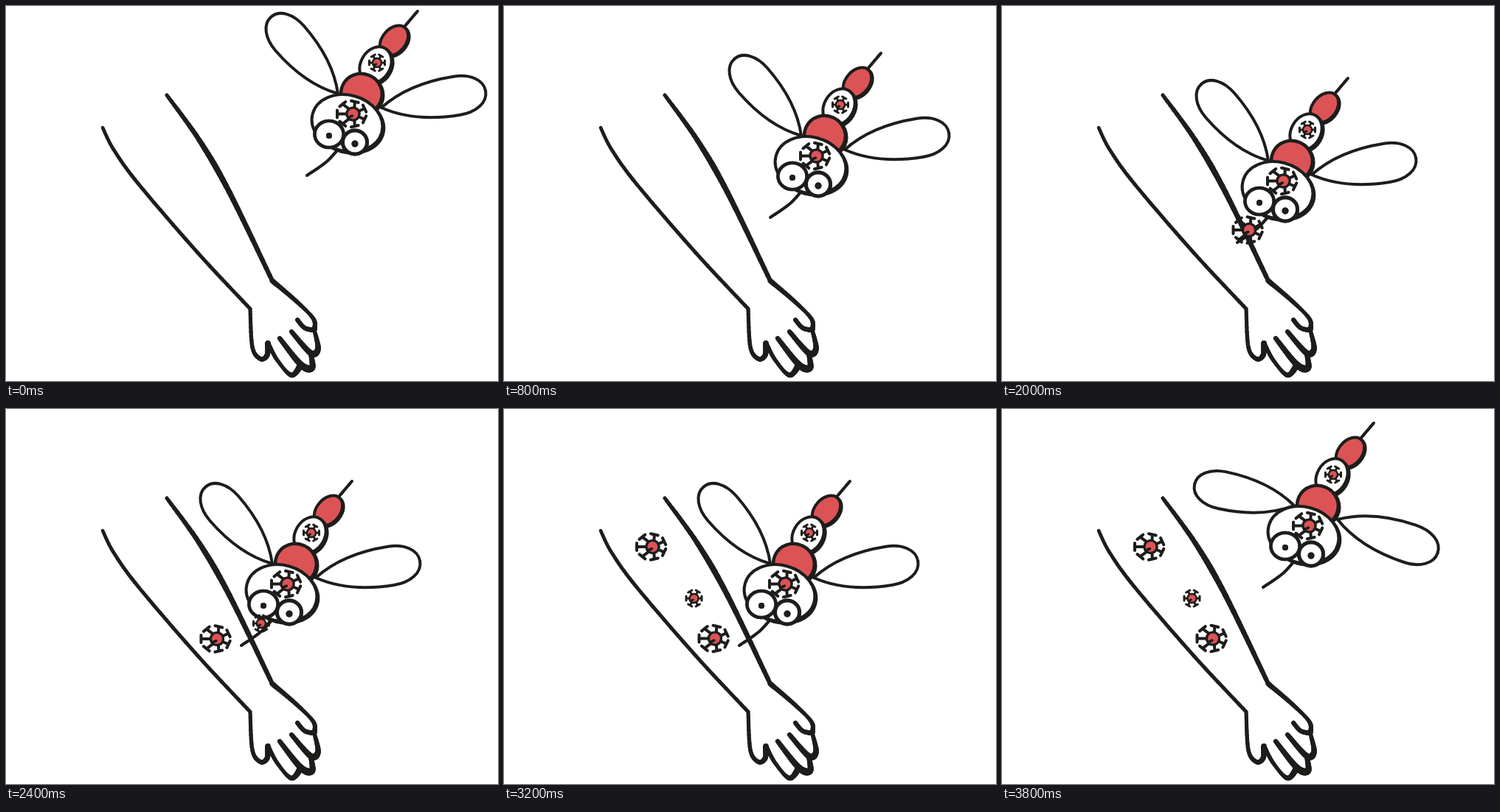
Animation of 667x509 px, one loop 4000 ms. Source, as an HTML page with a canvas:

```html
<!DOCTYPE html>
<html lang="en">
<head>
<meta charset="utf-8">
<title>Mosquito bite</title>
<style>
html, body { margin: 0; width: 100%; height: 100%; overflow: hidden; background: #fff; }
canvas { display: block; }
</style>
</head>
<body>
<canvas id="stage" width="667" height="509"></canvas>
<script>
const ctx = document.getElementById('stage').getContext('2d');
const INK = '#1d1d1b', RED = '#dc5356', WHITE = '#fff';
const STEP = 200, STEPS = 20;
const rad = deg => deg * Math.PI / 180;
const mix = (a, b, t) => a + (b - a) * t;

// Smooth ink line through a few points, width running from w0 over w1 to w2
function brush(pts, w0, w1 = w0, w2 = w1) {
  const last = pts.length - 1, n = 10 * last;
  const at = i => pts[Math.max(0, Math.min(last, i))];
  const point = u => {
    const i = Math.min(last - 1, Math.floor(u)), t = u - i;
    return [0, 1].map(k => {
      const [a, b, c, d] = [-1, 0, 1, 2].map(j => at(i + j)[k]);
      return b + 0.5 * t * (c - a + t * (2 * a - 5 * b + 4 * c - d + t * (3 * (b - c) + d - a)));
    });
  };
  for (let j = 0; j < n; j++) {
    const t = 2 * j / n;
    ctx.lineWidth = t < 1 ? mix(w0, w1, t) : mix(w1, w2, t - 1);
    ctx.beginPath();
    ctx.moveTo(...point(j / 10));
    ctx.lineTo(...point((j + 1) / 10));
    ctx.stroke();
  }
}

// Outlined ellipse with a heavier edge towards the lower right
function blob(x, y, rx, ry, deg, fill, line = 4, shade = 0) {
  ctx.beginPath();
  ctx.ellipse(x + shade, y + shade, rx + line / 2, ry + line / 2, rad(deg), 0, 7);
  ctx.fillStyle = INK;
  ctx.fill();
  ctx.beginPath();
  ctx.ellipse(x, y, rx, ry, rad(deg), 0, 7);
  ctx.fillStyle = fill;
  ctx.fill();
  ctx.lineWidth = line;
  ctx.stroke();
}

// Red core with a ring of T-shaped spikes
function virus(x, y, { spikes, rx, ry, core, bar, line, lean }) {
  ctx.lineWidth = line;
  for (let i = 0; i < spikes; i++) {
    const a = rad(180 + 360 * i / spikes), c = Math.cos(a), s = Math.sin(a);
    const ex = x + lean + rx * c, ey = y + ry * s;
    ctx.beginPath();
    ctx.moveTo(x + core * c, y + core * s);
    ctx.lineTo(ex, ey);
    ctx.moveTo(ex - s * bar, ey + c * bar);
    ctx.lineTo(ex + s * bar, ey - c * bar);
    ctx.stroke();
  }
  blob(x, y, core, core, 0, RED, line * 0.8);
  brush([[x - core * 0.8, y + core * 0.6], [x - 1, y + core * 0.3]], line * 0.8);
}
const BIG = { spikes: 7, rx: 19.5, ry: 17, core: 8.5, bar: 5, line: 4, lean: -2 };
const SMALL = { spikes: 6, rx: 10.5, ry: 11, core: 6, bar: 3, line: 3, lean: 0 };

function arm() {
  brush([[131, 165], [146, 195], [180, 242], [260, 335], [331, 411]], 4.5, 5, 5);
  brush([[218, 121], [262, 182], [303, 253], [361, 373]], 5, 8, 6);
  // wrist and thumb
  brush([[361, 373], [395, 402], [417, 425], [418, 440]], 7, 5, 7);
  brush([[331, 411], [334, 463], [345, 479], [354, 474], [355, 458]], 5, 6, 8);
  // fingers, from the far one to the near one
  brush([[395, 426], [405, 437], [418, 440]], 6, 6, 7);
  brush([[418, 440], [423, 465], [413, 471], [387, 442]], 5, 9, 6);
  brush([[413, 471], [415, 491], [400, 487], [371, 451]], 6, 10, 6);
  brush([[400, 487], [387, 501], [368, 481], [355, 457]], 9, 5, 6);
}

function wing(x, y, size, deg) {
  ctx.save();
  ctx.translate(x, y);
  ctx.rotate(rad(deg));
  ctx.lineWidth = 4;
  for (const side of [-1, 1]) {
    const w = side * size;
    ctx.beginPath();
    ctx.moveTo(0, 0);
    ctx.bezierCurveTo(0.2 * size, 0.13 * w, 0.45 * size, 0.185 * w, 0.72 * size, 0.185 * w);
    ctx.bezierCurveTo(0.88 * size, 0.185 * w, size, 0.11 * w, size, 0);
    ctx.stroke();
  }
  ctx.restore();
}

function mosquito(dx, dy, low) {
  ctx.save();
  ctx.translate(dx, dy);
  wing(450, 119, 138, low ? -168 : -131);
  wing(509, 138, 143, low ? 18.5 : -9);
  brush([[541, 27], [558, 7]], 4);
  brush([[453, 191], [435, 211], [408, 230]], 4);
  // abdomen to head
  blob(526, 47, 23, 16, -50, RED, 4, 1.5);
  blob(501, 80, 26, 20, -60, WHITE, 4, 2);
  virus(503, 77, SMALL);
  blob(482, 119, 28, 27, 25, RED, 4.5, 1.5);
  blob(462.5, 159, 48.5, 38, 15, WHITE, 4, 2);
  virus(470.5, 146.5, BIG);
  blob(438, 174, 19.5, 18, 0, WHITE, 4.5);
  blob(473, 185, 16.5, 16, 0, WHITE, 5);
  blob(438, 176, 2, 2, 0, INK);
  blob(473, 187, 2.5, 2.5, 0, INK);
  ctx.restore();
}

// Key points are [step, x, y]
const FLIGHT = [[0, 0, 0], [1, -14, 6], [4, -47, 57], [6, -89, 91],
  [16, -89, 91], [17, -82, 67], [18, -74, 46], [19, -54, 12]];
const VIRUSES = [
  { kind: BIG, keys: [[7, 375, 256], [8, 363, 282], [10, 335, 304], [11, 313, 324],
    [12, 286, 312], [14, 251, 246], [15, 242, 218], [16, 201.5, 187]] },
  { kind: SMALL, keys: [[11, 371, 264], [13, 321, 318], [14, 289.5, 298], [16, 257.5, 257]] },
  { kind: BIG, keys: [[14, 364, 282], [15, 341, 304], [16, 286, 311.5]] }
];

function follow(keys, step) {
  const i = keys.findIndex(k => k[0] > step);
  if (i < 0) return keys[keys.length - 1].slice(1);
  const [s0, x0, y0] = keys[i - 1], [s1, x1, y1] = keys[i];
  const t = (step - s0) / (s1 - s0);
  return [mix(x0, x1, t), mix(y0, y1, t)];
}

function draw(step) {
  ctx.fillStyle = WHITE;
  ctx.fillRect(0, 0, 667, 509);
  ctx.strokeStyle = INK;
  ctx.lineCap = ctx.lineJoin = 'round';
  arm();
  const flying = step < 6 || step > 16;
  mosquito(...follow(FLIGHT, step), flying && step % 2 === 1);
  for (const { kind, keys } of VIRUSES) {
    if (step >= keys[0][0]) virus(...follow(keys, step), kind);
  }
}

let shown = -1;
function tick() {
  const step = Math.floor(performance.now() / STEP) % STEPS;
  if (step !== shown) draw(shown = step);
  requestAnimationFrame(tick);
}
tick();
</script>
</body>
</html>
```
